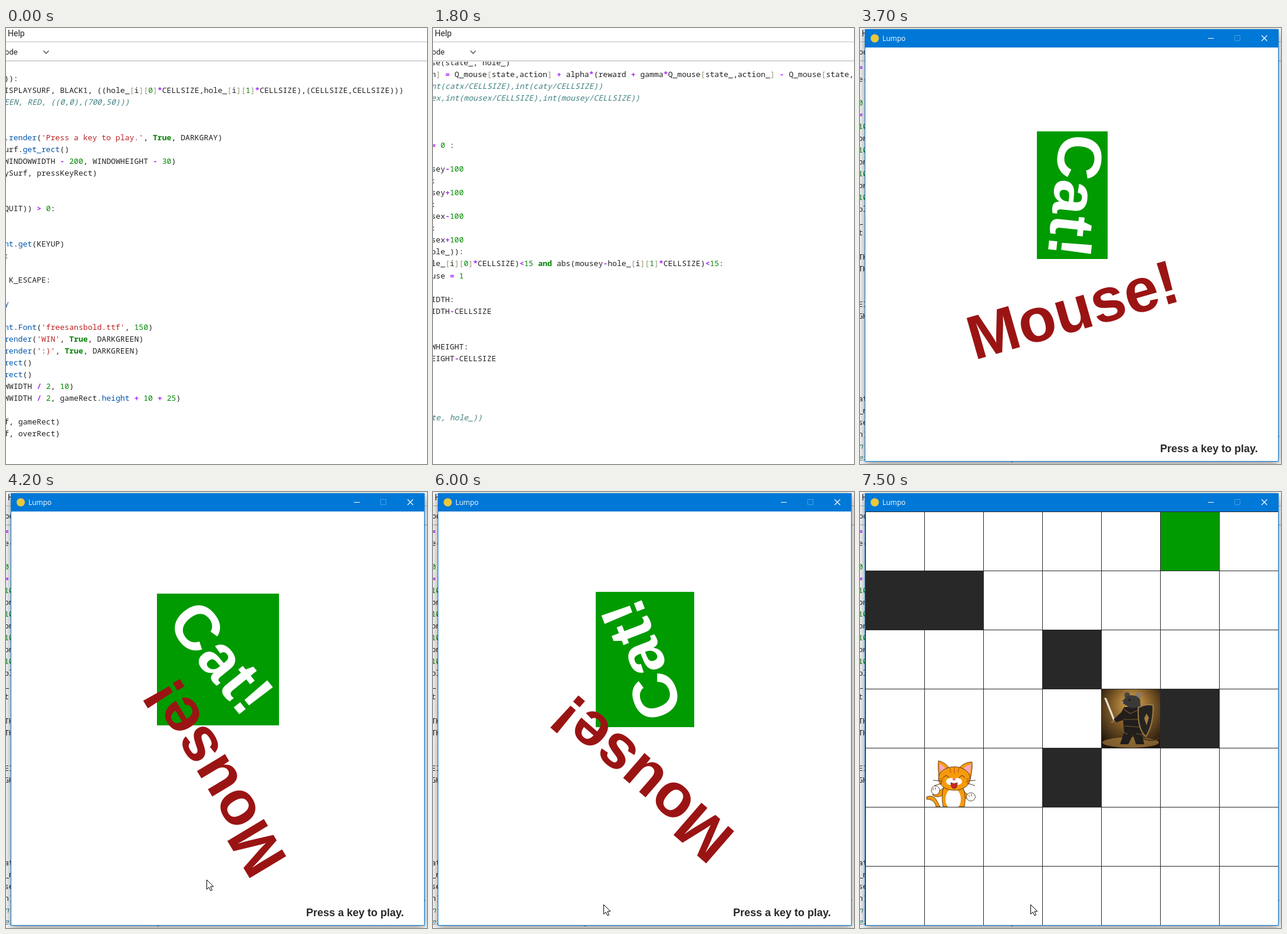
Write an HTML page with a canvas that moves like this. It is 714 px wide and 738 px high and loops after 8 s.

```html
<!DOCTYPE html>
<html lang="en">
<head>
<meta charset="utf-8">
<title>Cat and mouse</title>
<style>
html, body { margin: 0; width: 714px; height: 738px; overflow: hidden; background: #fff; }
canvas { display: block; }
</style>
</head>
<body>
<canvas id="stage" width="714" height="738"></canvas>
<script>
const ctx = document.getElementById('stage').getContext('2d');
const LOOP = 8000, STEP = 100;
const CHAR = 7.875, ROW = 20.03, LEFT = -3;
const DARK = '#282828', GREEN = '#009b00';

// Blocks of code: first row, then lines; a leading # marks a comment.
const blocks = [
  [0, `= 0 :
e(state, hole_)

0 :
= 0 :
100
on == 1:
100
on == 2:
100
on == 3:
100
ole_)):
_[i][0]*CELLSIZE)<15 and abs(caty-hole_[i][1]*CELLSIZE)<15:
t = 1

TH:
TH-CELLSIZE


EIGHT:
GHT-CELLSIZE`],
  [28, `at(state_, hole_)
_next, hole_)
se(state_, hole_)
n] = Q_mouse[state,action] + alpha*(reward + gamma*Q_mouse[state_,action_] - Q_mouse[state,action])
#nt(catx/CELLSIZE),int(caty/CELLSIZE))
#ex,int(mousex/CELLSIZE),int(mousey/CELLSIZE))



= 0 :

sey-100
:
sey+100
:
sex-100
:
sex+100
ole_)):
le_[i][0]*CELLSIZE)<15 and abs(mousey-hole_[i][1]*CELLSIZE)<15:
use = 1

IDTH:
IDTH-CELLSIZE


WHEIGHT:
EIGHT-CELLSIZE`],
  [60, `#te, hole_))`],
  [66, `x, caty):
t_img, (catx, caty))


sex, mousey):
se_img, (mousex, mousey))


DTH, CELLSIZE):
RK, (x, 0), (x, WINDOWHEIGHT))
EIGHT, CELLSIZE):
RK, (0, y), (WINDOWWIDTH, y))`],
  [81, `)):
ISPLAYSURF, BLACK1, ((hole_[i][0]*CELLSIZE,hole_[i][1]*CELLSIZE),(CELLSIZE,CELLSIZE)))
#EEN, RED, ((0,0),(700,50)))


.render('Press a key to play.', True, DARKGRAY)
urf.get_rect()
WINDOWWIDTH - 200, WINDOWHEIGHT - 30)
ySurf, pressKeyRect)


QUIT)) > 0:


nt.get(KEYUP)
:

 K_ESCAPE:

y

nt.Font('freesansbold.ttf', 150)
render('WIN', True, DARKGREEN)
render(':)', True, DARKGREEN)
rect()
rect()
WWIDTH / 2, 10)
WWIDTH / 2, gameRect.height + 10 + 25)

f, gameRect)
f, overRect)`]
];

// Token kinds in order of the groups below: colour and font style.
const TOKEN = /('[^']*')|\b(\d+)\b|\b(and|True)\b|([-+*\/<>=]+)|([\[\]])|\b(nt|render|get_rect|get|Font|height|rect|y)\b|[^\s'\[\]\w]|\w+/g;
const kinds = [['#ba2121'], ['#008800'], ['#008000', 'bold '], ['#aa22ff', 'bold '], ['#999977'], ['#0055aa']];

function text(s, x, y, font, color) {
  ctx.font = font;
  ctx.fillStyle = color;
  ctx.fillText(s, x, y);
}
function rect(x, y, w, h, color) {
  ctx.fillStyle = color;
  ctx.fillRect(x, y, w, h);
}
function shape(d, fill, stroke, width = 1) {
  const p = new Path2D(d);
  if (fill) { ctx.fillStyle = fill; ctx.fill(p); }
  if (stroke) { ctx.strokeStyle = stroke; ctx.lineWidth = width; ctx.stroke(p); }
}
function oval(x, y, rx, ry, fill, stroke, width = 1) {
  ctx.beginPath();
  ctx.ellipse(x, y, rx, ry, 0, 0, 7);
  ctx.fillStyle = fill;
  ctx.fill();
  if (stroke) { ctx.strokeStyle = stroke; ctx.lineWidth = width; ctx.stroke(); }
}
function at(x, y, draw) {
  ctx.save();
  ctx.translate(x, y);
  draw();
  ctx.restore();
}
// Linear path through [time, value...] keys.
function track(keys, t) {
  let i = 1;
  while (i < keys.length - 1 && t > keys[i][0]) i++;
  const a = keys[i - 1], b = keys[i];
  const k = Math.max(0, Math.min(1, (t - a[0]) / (b[0] - a[0])));
  return a.slice(1).map((v, j) => v + (b[j + 1] - v) * k);
}

function codeLine(line, y) {
  const mono = '13.125px "Noto Sans Mono", monospace';
  if (line[0] === '#') return text(line.slice(1), LEFT, y, 'italic ' + mono, '#408080');
  for (const m of line.matchAll(TOKEN)) {
    const [color, style = ''] = kinds[m.slice(1).findIndex(g => g)] || ['#212121'];
    text(m[0], m.index * CHAR + LEFT, y, style + mono, color);
  }
}
const scrollKeys = [[0, 0], [300, 200], [600, 200], [1100, 500], [1300, 500], [1800, 994.5], [2300, 1603.5]];
function editor(t) {
  const top = 90 + track(scrollKeys, t)[0];
  rect(0, 0, 714, 738, '#fff');
  for (const [first, src] of blocks)
    src.split('\n').forEach((line, i) => {
      const y = Math.round(top + (first + i - 81) * ROW);
      if (y > 40 && y < 760) codeLine(line, y);
    });
  rect(0, 0, 714, 56, '#fff');
  rect(0, 23, 714, 1, '#bdbdbd');
  rect(0, 55, 714, 1, '#bdbdbd');
  rect(0, 56, 714, 1, '#ececec');
  text('Help', 3, 14, '14px Roboto, sans-serif', '#212121');
  text('ode', -2, 45, '13px Roboto, sans-serif', '#212121');
  shape('M63.5 38.5l4.5 4.5 4.5-4.5', null, '#616161', 1.7);
}

function frameWindow() {
  ctx.save();
  ctx.shadowColor = 'rgba(0,0,0,.5)';
  ctx.shadowBlur = 14;
  ctx.shadowOffsetY = 3;
  rect(8, 2, 702, 732, '#0078d7');
  ctx.restore();
  rect(9, 33, 700, 700, '#fff');
  oval(25, 17.5, 7, 7, '#e9c83c');
  text('Lumpo', 38, 22, '12px "Open Sans", sans-serif', '#fff');
  rect(590, 17, 10, 1, '#fff');
  shape('M635.5 12.5h9v9h-9z', null, '#4a9fe3');
  shape('M681 12.5l9.5 9.5m0-9.5l-9.5 9.5', null, '#fff', 1.2);
}

function spinText(s, y, deg, size, left, color, gap) {
  at(359.5, y, () => {
    ctx.rotate(-deg * Math.PI / 180);
    ctx.letterSpacing = gap;
    text(s, left, 30.5, `bold ${size}px "Liberation Sans", sans-serif`, color);
    ctx.letterSpacing = '0px';
  });
}
function titleScreen(t) {
  const n = (t - 3100) / STEP, deg = 210 + 9 * n;
  const c = Math.abs(Math.cos(deg * Math.PI / 180)), s = Math.abs(Math.sin(deg * Math.PI / 180));
  const w = Math.round(207 * c + 99 * s), h = Math.round(207 * s + 99 * c);
  rect(Math.round(359.5 - w / 2), Math.round(283 - h / 2), w, h, GREEN);
  spinText('Cat!', 283, deg, 106, -103.5, '#fff', '1px');
  spinText('Mouse!', 483, 250 + 21 * n, 105, -181, '#9b1414', '0px');
  text('Press a key to play.', 509, 718, 'bold 18px "Liberation Sans", sans-serif', DARK);
}

function cat() {
  const fur = '#f69a0c', line = '#3a2410';
  shape('M4 83c7-3 15 0 18 8l5 9h-7c-1-7-6-13-16-13z', fur, line, .8);
  shape('M32 68c-5 5-10 7-15 6l-3 6c6 5 13 3 19-1z', fur, line, .8);
  shape('M65 68c3 8 7 11 14 12l1 7c-8 1-14-3-17-8z', fur, line, .8);
  shape('M33 66c-4 12-3 23-1 34h36c2-12 2-23-3-34z', fur, line, .8);
  oval(49, 87, 13, 18, '#fff');
  oval(19, 72, 7, 7.5, '#fff', line, .8);
  oval(79, 83, 7.5, 7, '#fff', line, .8);
  shape('M15 68v4m4-5v4m56 9l2 3m3-5v4', null, line, .8);
  shape('M25 52c-1-12-2-21-1-30 7 1 14 6 18 12zM60 33c6-6 13-9 21-9 1 10-1 20-3 29z', fur, line, .8);
  shape('M28 43c-1-6-2-11-2-16 5 2 8 5 11 9zM66 35c4-4 8-6 13-7 0 7-1 12-2 16z', '#f8a9c1');
  oval(51, 52, 27, 20, fur, line, .8);
  shape('M43 33l2 9m6-10v11m8-10l-2 9M25 52l7 1m-6 6l6-2m46-5l-7 1m6 6l-6-2', null, '#c4660a', 1.5);
  oval(45, 57, 8, 6, '#fff');
  oval(56, 57, 8, 6, '#fff');
  shape('M45 59q6 3 11 0c0 7-2 10-5 10s-6-3-6-10z', '#c8242c', line, .8);
  oval(50.5, 53.5, 2.7, 1.8, '#e5627c');
  shape('M32 51q5-8 10 0m17 0q5-8 10 0M30 56l-15-1m15 5l-13 4m56-8l14-1m-14 5l13 4', null, line, .9);
}

function mouse() {
  const glow = ctx.createRadialGradient(52, 22, 4, 52, 40, 68);
  glow.addColorStop(0, '#d6a54f');
  glow.addColorStop(.45, '#86602b');
  glow.addColorStop(1, '#20160b');
  rect(0, 0, 100, 100, glow);
  oval(50, 91, 48, 9, 'rgba(196,147,73,.55)');
  shape('M70 84q18 7 29-1', null, '#4b321c', 2);
  shape('M5 15l4 1 15 38-3 1z', '#e6e0d2');
  shape('M17 57l11-5', null, '#8f7133', 2.5);
  shape('M39 31l26-1 8 19-4 27 4 18H59l-5-16-8 16H32l7-21-2-20-11 4-5-5 13-12z', '#211e1c');
  shape('M39 35l10 7 14-6M38 52h27M39 63l26 2M38 74l7 3m14-1l10 2', null, '#77592c', 1.2);
  oval(44, 11, 5, 5, '#4b4743');
  oval(64, 11, 6, 5, '#8d7867');
  shape('M34 23l9-10q15-6 23 5l1 13-17 2z', '#3b3938');
  oval(36, 23, 2, 1.6, '#b98f80');
  oval(48, 19, 1.5, 1.5, '#0b0b0b');
  shape('M63 32q14-7 25-4 1 32-12 53-15-12-13-49z', '#252322', '#9c7a45', 2);
  shape('M77 42l4 7-4 13-4-12z', '#a47d3e');
}

function board(t) {
  const moved = t >= 7500;
  const cell = (x, y, color) => rect(9 + x * 100, 33 + y * 100, 100, 100, color);
  for (const [x, y] of [[0, 1], [1, 1], [3, 2], [5, 3], [3, 4]]) cell(x, y, DARK);
  cell(5, 0, GREEN);
  at(109, moved ? 433 : 533, cat);
  at(409, moved ? 333 : 233, mouse);
  for (let i = 0; i < 7; i++) {
    rect(9 + i * 100, 33, 1, 700, DARK);
    rect(9, 33 + i * 100, 700, 1, DARK);
  }
}

const pointerKeys = [[4100, 364, 632], [4200, 340, 656], [4500, 289, 698]];
function pointer(t) {
  const [x, y] = track(pointerKeys, t);
  at(x + .5, y + .5, () => shape('M0 0v16l3.7-3.5 2.8 6 2.6-1.1-2.7-6H11.5z', '#fff', '#000'));
}

function draw() {
  const t = Math.floor(performance.now() % LOOP / STEP) * STEP;
  editor(t);
  if (t >= 3100) {
    frameWindow();
    (t < 7000 ? titleScreen : board)(t);
    if (t >= 4100) pointer(t);
  }
  requestAnimationFrame(draw);
}
draw();
</script>
</body>
</html>
```
